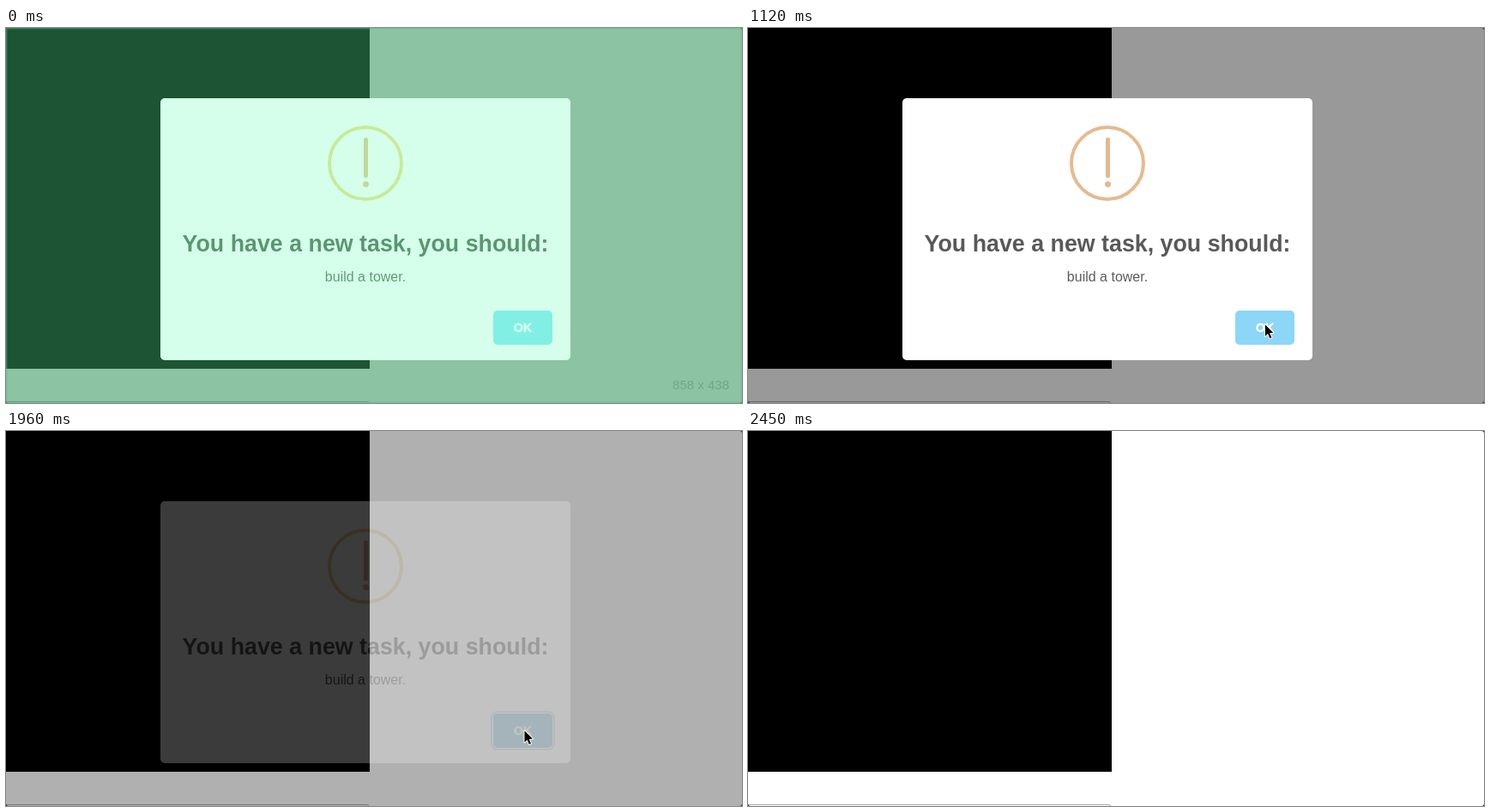
An HTML page with a canvas for the animation above (2.87 s loop, 858 px wide and 438 px high).

```html
<!DOCTYPE html>
<html lang="en">
<head>
<meta charset="utf-8">
<title>New task dialog</title>
<style>
  html, body { margin: 0; width: 100%; height: 100%; overflow: hidden; background: #fff; }
  canvas { display: block; width: 858px; height: 438px; }
</style>
</head>
<body>
<canvas id="stage" width="858" height="438"></canvas>
<script>
const W = 858, H = 438, LOOP = 2870, STEP = 70;
const SANS = '"Liberation Sans", Arial, sans-serif';
const FOCUS = 1330, PRESS = 1820, CLOSE = 1910, HIDE = 2450;
const YELLOW = [235, 208, 142], ORANGE = [230, 186, 142];

const ctx = document.getElementById('stage').getContext('2d');
const layer = document.createElement('canvas');
layer.width = W;
layer.height = H;
const box = layer.getContext('2d');

// Pointer tip: time, x, y
const path = [
  [490, 540, 431], [560, 560, 395], [630, 575, 362], [700, 584, 338],
  [770, 587, 329], [980, 600, 344], [1330, 606, 350], [1540, 606, 350],
  [1890, 604, 349], [1960, 604, 350], [2240, 604, 350],
  [2310, 558, 377], [2380, 488, 410]
];

const clamp = v => Math.max(0, Math.min(1, v));
const mix = (a, b, k) => a + (b - a) * k;
const ramp = (t, from, to) => clamp((t - from) / (to - from));

// The CSS "ease" curve, cubic-bezier(.25, .1, .25, 1)
function ease(x) {
  let lo = 0, hi = 1;
  for (let i = 0; i < 20; i++) {
    const s = (lo + hi) / 2, r = 1 - s;
    if (0.75 * r * r * s + 0.75 * r * s * s + s * s * s < x) lo = s;
    else hi = s;
  }
  const s = (lo + hi) / 2, r = 1 - s;
  return 0.3 * r * r * s + 3 * r * s * s + s * s * s;
}

function round(c, x, y, w, h, r, fill) {
  c.fillStyle = fill;
  c.beginPath();
  c.roundRect(x, y, w, h, r);
  c.fill();
}

function label(c, text, x, y, font, fill, align = 'center') {
  c.font = font + ' ' + SANS;
  c.textAlign = align;
  c.fillStyle = fill;
  c.fillText(text, x, y);
}

function drawPage() {
  ctx.fillStyle = '#fff';
  ctx.fillRect(0, 0, W, H);
  ctx.fillStyle = '#000';
  ctx.fillRect(0, 0, 424, 398);
  ctx.strokeStyle = '#aaa';
  ctx.lineWidth = 1;
  ctx.beginPath();
  ctx.moveTo(0, 436.5);
  ctx.lineTo(420, 436.5);
  ctx.quadraticCurveTo(423, 436.5, 423.5, 439);
  ctx.stroke();
}

function drawIcon(t) {
  const k = ramp(t, 70, 350) - ramp(t, 1540, 1820);
  const rgb = YELLOW.map((v, i) => Math.round(mix(v, ORANGE[i], k)));
  box.strokeStyle = `rgb(${rgb})`;
  box.lineWidth = 4;
  box.beginPath();
  box.arc(419, 158, 42, 0, 7);
  box.stroke();
  round(box, 417, 128, 5, 47, 2, '#e4b78e');
  round(box, 416, 179, 7, 7, 3.5, '#e4b78e');
}

function drawButton(t) {
  if (t >= FOCUS) {
    round(box, 565, 327, 75, 46, 8, '#c2d7e5');
    round(box, 567, 329, 71, 42, 6, '#fff');
  }
  round(box, 568, 330, 69, 40, 5, t >= PRESS ? '#7fc2de' : '#8cd6f7');
  label(box, 'OK', 602.5, 355, 'bold 14px', '#fff');
  box.strokeStyle = '#fff';
  box.lineWidth = 0.5;
  box.strokeText('OK', 602.5, 355);
}

function drawDialog(t) {
  box.clearRect(0, 0, W, H);
  round(box, 180, 82, 478, 306, 5, '#fff');
  drawIcon(t);
  label(box, 'You have a new task, you should:', 419, 261, 'bold 26.8px', '#595959');
  label(box, 'build a tower.', 419, 296, '16px', '#5c5c5c');
  drawButton(t);
}

function drawOverlay(t) {
  const shade = 1 - ease(ramp(t, CLOSE, CLOSE + 300));
  const body = 1 - ease(ramp(t, CLOSE, CLOSE + 120));
  ctx.fillStyle = `rgba(0,0,0,${0.4 * shade})`;
  ctx.fillRect(0, 0, W, H);
  if (body < 0.01) return;
  drawDialog(t);
  ctx.globalAlpha = shade * body;
  ctx.drawImage(layer, 0, 0);
  ctx.globalAlpha = 1;
}

// Dark slivers left by the rounded window corners
function drawCorners() {
  ctx.fillStyle = '#222';
  for (const [x, y, dx, dy] of [[W, 0, -3, 3], [W, H, -3, -3], [0, H, 3, -3]]) {
    ctx.beginPath();
    ctx.moveTo(x, y);
    ctx.lineTo(x + dx, y);
    ctx.quadraticCurveTo(x, y, x, y + dy);
    ctx.fill();
  }
}

function drawTint() {
  ctx.fillStyle = 'rgba(0,0,0,.28)';
  ctx.fillRect(0, 0, W, H);
  ctx.globalCompositeOperation = 'lighter';
  ctx.fillStyle = 'rgb(29,84,51)';
  ctx.fillRect(0, 0, W, H);
  ctx.globalCompositeOperation = 'source-over';
  ctx.strokeStyle = 'rgba(80,185,140,.4)';
  ctx.lineWidth = 2;
  ctx.strokeRect(0.5, 0.5, W - 1, H - 1);
  label(ctx, '858 x 438', 843, 422, '15px', '#70a68a', 'right');
}

function drawPointer(t) {
  if (t < path[0][0] || t >= HIDE) return;
  let i = 0;
  while (i < path.length - 2 && path[i + 1][0] <= t) i++;
  const [t0, x0, y0] = path[i], [t1, x1, y1] = path[i + 1];
  const k = ramp(t, t0, t1);
  ctx.save();
  ctx.translate(mix(x0, x1, k) + 0.5, mix(y0, y1, k));
  ctx.beginPath();
  ctx.moveTo(0, 0);
  ctx.lineTo(0, 13.5);
  ctx.lineTo(3.1, 10.7);
  ctx.lineTo(5.4, 16);
  ctx.lineTo(7.5, 15.1);
  ctx.lineTo(5.2, 9.9);
  ctx.lineTo(9.4, 9.6);
  ctx.closePath();
  ctx.lineJoin = 'round';
  ctx.lineWidth = 2;
  ctx.strokeStyle = '#fff';
  ctx.stroke();
  ctx.fillStyle = '#000';
  ctx.fill();
  ctx.restore();
}

function draw() {
  const now = performance.now() % LOOP;
  const t = Math.floor(now / STEP) * STEP;
  drawPage();
  drawOverlay(t);
  drawCorners();
  if (t < STEP) drawTint();
  drawPointer(t);
  requestAnimationFrame(draw);
}
draw();
</script>
</body>
</html>
```
